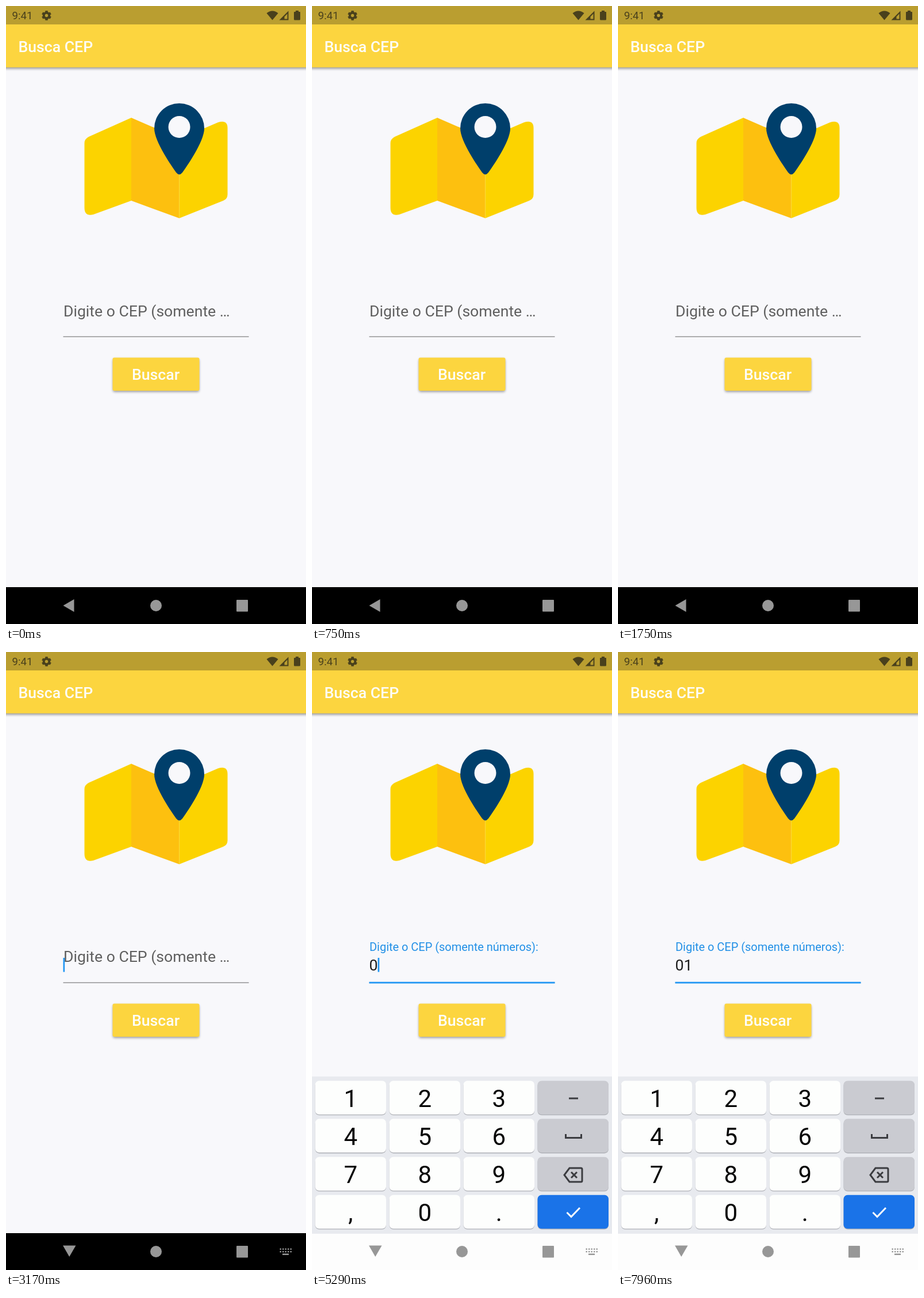
These frames come from a looping animation (522 by 1073 pixels, 8 s). An HTML page:

```html
<!DOCTYPE html>
<html lang="pt-BR">
<head>
<meta charset="utf-8">
<title>Busca CEP</title>
<style>
  html, body { margin: 0; width: 100%; height: 100%; overflow: hidden; background: #f8f8fb; }
  svg { display: block; width: 100vw; height: 100vh; }
  text { font-family: Roboto, "Noto Sans", sans-serif; font-size: 26.6px; white-space: pre; }
  .medium { font-weight: 500; fill: #fdfdfb; }
  .key-text { font-size: 42px; text-anchor: middle; fill: #050505; }
  .line { fill: none; stroke: #3b3c40; stroke-width: 3; }
  .hidden { opacity: 0; }
  #label { fill: #5f5f5f; transform: translate(100px, 538.5px); }
</style>
</head>
<body>
<svg viewBox="0 0 522 1073" preserveAspectRatio="none">
  <defs>
    <filter id="soft" x="-10%" y="-30%" width="120%" height="180%"><feGaussianBlur stdDeviation="2"/></filter>
  </defs>
  <rect width="522" height="1073" fill="#f8f8fb"/>

  <!-- app bar -->
  <rect x="-10" y="90" width="542" height="19" fill="#000" opacity=".38" filter="url(#soft)"/>
  <rect y="31" width="522" height="75.500" fill="#fcd53f"/>
  <rect width="522" height="32" fill="#ba9e30"/>
  <text class="medium" x="21.500" y="79.500">Busca CEP</text>

  <!-- status bar -->
  <g fill="#49401c">
    <text x="10.500" y="23.300" style="font-size:18.6px">9:41</text>
    <circle cx="70.500" cy="16.500" r="4.700" fill="none" stroke="#49401c" stroke-width="4"/>
    <g id="teeth"></g>
    <path d="M453.500 12.500Q463.500 4.500 473.500 12.500L463.500 24.500Z"/>
    <path d="M491.500 8.500V24.500H475.500ZM489.500 13.500L484.500 18.500V22.500H489.500Z" fill-rule="evenodd"/>
    <path d="M504 8h5v2h2q1 0 1 1v12q0 1.500-1.500 1.500h-8q-1.500 0-1.500-1.500v-12q0-1 1-1h2z"/>
  </g>

  <!-- map and pin -->
  <path d="M218 194L144 227Q136.500 231 136.500 238V350Q136.500 366 152 362L218 338Z" fill="#fcd300"/>
  <path d="M218 194L301.500 230V368.500L218 338Z" fill="#fdc00f"/>
  <path d="M301.500 231L369 202Q385.500 197 385.500 212V327Q385.500 335 378 338L301.500 368.500Z" fill="#fcd300"/>
  <path d="M258 212.500A43.500 43.500 0 0 1 345 212.500C345 232 322 268 307 289Q301.500 296 296 289C281 268 258 232 258 212.500Z" fill="#003f6b"/>
  <circle cx="301.500" cy="210" r="19" fill="#f8f8fb"/>

  <!-- form -->
  <g id="label">
    <text id="short">Digite o CEP (somente …</text>
    <text id="full" class="hidden">Digite o CEP (somente números):</text>
  </g>
  <text id="one" class="hidden" x="99.500" y="552.700" fill="#1c1c1c">0</text>
  <text id="two" class="hidden" x="99.500" y="552.700" fill="#1c1c1c">01</text>
  <rect id="caret" class="hidden" x="99.500" y="531" width="2.700" height="24.500" fill="#2196f3"/>
  <rect x="99.500" y="573.500" width="323" height="1.300" fill="#868686"/>
  <rect id="focus" class="hidden" x="99.500" y="572.700" width="323" height="2.800" fill="#2196f3"/>
  <rect x="186" y="613" width="150" height="57" rx="3" fill="#000" opacity=".38" filter="url(#soft)"/>
  <rect x="185.500" y="610.500" width="151" height="57.500" rx="3" fill="#fcd53f"/>
  <text class="medium" x="219" y="649">Buscar</text>

  <!-- navigation and keyboard -->
  <rect y="1009" width="522" height="64" fill="#000"/>
  <g id="board" class="hidden">
    <rect y="737" width="522" height="443" fill="#e8eaef"/>
    <g id="keys"></g>
    <path class="line" d="M447 775H463"/>
    <path class="line" d="M441.500 837V843.500H468.500V837"/>
    <path class="line" d="M448 896H468Q470 896 470 898V918Q470 920 468 920H448L439 908ZM451 903L461 913M461 903L451 913"/>
    <path class="line" d="M443.500 973L451 980.500L466 965" style="stroke:#fff"/>
  </g>
  <rect id="light" class="hidden" y="1010" width="522" height="63" fill="#fdfdfd"/>
  <g fill="#979797">
    <path id="back" d="M99.500 1041L118.500 1030V1052Z"/>
    <circle cx="261" cy="1041" r="10"/>
    <rect x="401" y="1031" width="20" height="20.500" rx="1"/>
    <g id="ime" class="hidden">
      <path d="M99 1030.500H121.500L110.200 1050Z"/>
      <rect x="481" y="1044.500" width="11" height="2.500"/>
    </g>
  </g>
</svg>
<script>
const LOOP = 8000;
const $ = id => document.getElementById(id);

function add(parent, tag, attrs, text) {
  const el = document.createElementNS('http://www.w3.org/2000/svg', tag);
  for (const name in attrs) el.setAttribute(name, attrs[name]);
  if (text) el.textContent = text;
  return parent.appendChild(el);
}

for (let i = 0; i < 6; i++) {
  add($('teeth'), 'rect', { x: 68.3, y: 8.2, width: 4.4, height: 4, transform: `rotate(${i * 60} 70.5 16.5)` });
}

['123-', '456_', '789<', ',0.>'].forEach((row, r) => [...row].forEach((char, c) => {
  const x = 5.5 + c * 129, y = 744.5 + r * 66.1;
  const fill = c < 3 ? '#fdfefd' : r < 3 ? '#cacbd1' : '#1a73e8';
  const size = { x, width: 123.5, height: 58.5, rx: 7 };
  add($('keys'), 'rect', { ...size, y: y + 1.3, fill: '#aeb0b6' });
  add($('keys'), 'rect', { ...size, y, fill });
  if (c < 3) add($('keys'), 'text', { class: 'key-text', x: x + 61.7, y: y + 45.5 }, char);
}));

for (let i = 0; i < 10; i++) {
  add($('ime'), 'rect', { x: 476.5 + i % 5 * 4.5, y: 1035.5 + (i > 4) * 4.5, width: 2.4, height: 2.4 });
}

// Each step: [ms, style, easing towards the next step]; without easing the style holds.
function play(id, steps) {
  const frames = steps.map(([ms, style, easing = 'steps(1, end)']) => ({ offset: ms / LOOP, easing, ...style }));
  frames.push({ ...frames[frames.length - 1], offset: 1 });
  $(id).animate(frames, { duration: LOOP, iterations: Infinity });
}

const on = { opacity: 1 }, off = { opacity: 0 };
const EASE = 'cubic-bezier(.4, 0, .2, 1)', OUT = 'cubic-bezier(0, 0, .2, 1)';
const NAV = 3120, FOCUS = 3170, FLOAT = 3370, BOARD = 3400, READY = 3640;
const FIRST = 4840, SECOND = 7170;

const show = (id, from, to) => play(id, [[0, off], [from, on], ...(to ? [[to, off]] : [])]);
const hide = (id, at) => play(id, [[0, on], [at, off]]);
const fade = (id, from, to) => play(id, [[0, off], [from, off, 'linear'], [to, on]]);

hide('back', NAV);
show('ime', NAV);
hide('short', 3265);
show('full', 3265);
fade('focus', FOCUS, FLOAT);
fade('light', BOARD, READY);
show('one', FIRST, SECOND);
show('two', SECOND);

const rest = { transform: 'translate(100px, 538.5px) scale(1)', fill: '#5f5f5f' };
const lifted = { transform: 'translate(100px, 518.8px) scale(.75)', fill: '#2290e6' };
play('label', [[0, rest], [FOCUS, rest, EASE], [FLOAT, lifted]]);

const low = { opacity: 0, transform: 'translateY(100px)' };
play('board', [[0, low], [BOARD, low, OUT], [READY, { opacity: 1, transform: 'translateY(0px)' }]]);

// The caret blinks every half second and restarts with each digit.
const caret = (x, shown) => ({ opacity: +shown, transform: `translateX(${x}px)` });
const blink = [[0, caret(0, false)], [NAV, caret(0, true)], [3920, caret(0, false)], [4500, caret(0, true)]];
[[FIRST, SECOND, 15], [SECOND, LOOP, 30]].forEach(([from, to, x]) => {
  for (let ms = from, shown = true; ms < to; ms += 500, shown = !shown) blink.push([ms, caret(x, shown)]);
});
play('caret', blink);
</script>
</body>
</html>
```
